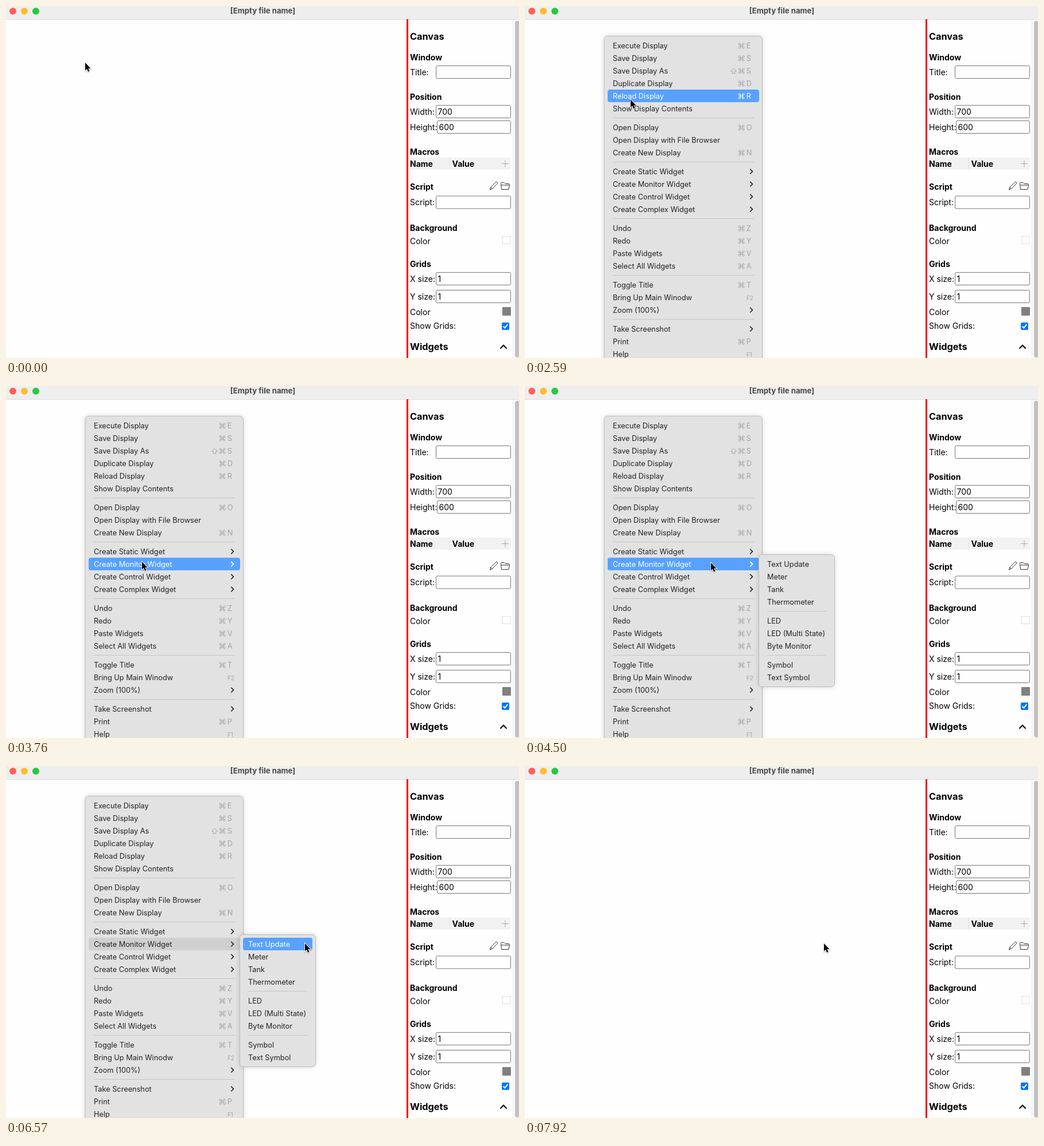
Recreate the animation shown at these times as an HTML page. Size 894x615 px, loop 8 s.

```html
<!DOCTYPE html>
<html lang="en">
<head>
<meta charset="utf-8">
<title>Display editor</title>
<style>
html, body { margin: 0; width: 100%; height: 100%; overflow: hidden; background: #fefefe; }
svg { display: block; width: 894px; height: 615px; font: 14px Inter, "Liberation Sans", sans-serif; }
.bold { font-weight: 700; }
.big { font-size: 16.3px; font-weight: 700; }
.title { font-size: 13.2px; font-weight: 700; fill: #474747; text-anchor: middle; }
.field { fill: #fff; stroke: #767676; }
.line { fill: none; stroke: #333; stroke-linejoin: round; }
.menu { font-size: 12.75px; }
.panel { fill: #e2e2e2; stroke: #bcbcbc; }
.shadow { fill: #000; opacity: .16; filter: blur(5px); }
.sep { stroke: #c6c6c6; }
.row rect { fill: none; }
.row text { fill: #232323; }
.row .key { fill: #a3a3a3; }
.row .small { font-size: 9.8px; }
.row .mark { fill: none; stroke: #a3a3a3; }
.row .more { fill: none; stroke: #2a2a2a; stroke-width: 1.7; stroke-linecap: round; stroke-linejoin: round; }
.row.held rect { fill: #d0d0d0; }
.row.on rect { fill: #58a1ff; }
.row.on text { fill: #fff; }
.row.on .mark, .row.on .more { stroke: #fff; }
#cursor { filter: drop-shadow(0 1px 1px rgba(0, 0, 0, .3)); }
</style>
</head>
<body>
<svg viewBox="0 0 894 615">
  <rect width="894" height="615" fill="#fefefe"/>
  <g id="side"></g>
  <rect width="894" height="23" fill="#eee"/>
  <rect y="23" width="894" height="1" fill="#dcdcdc"/>
  <circle cx="12" cy="9" r="6" fill="#ff5f57"/>
  <circle cx="32" cy="9" r="6" fill="#febc2e"/>
  <circle cx="52" cy="9" r="6" fill="#28c840"/>
  <text class="title" x="447.5" y="13">[Empty file name]</text>
  <rect x="698" y="23" width="3" height="592" fill="#f00000"/>
  <g id="menus" class="menu">
    <g id="main"></g>
    <g id="sub"></g>
  </g>
  <path id="cursor" d="M0 0V13.6L3 10.8 5.1 15.7 7.5 14.7 5.4 9.9H9.6Z" fill="#000" stroke="#fff" stroke-width="1.8" paint-order="stroke"/>
</svg>
<script>
const $ = id => document.getElementById(id);

// Sidebar
const label = (s, y, cls = '', x = 704) => `<text class="${cls}" x="${x}" y="${y}">${s}</text>`;
const field = (y, value = '', x = 749) =>
  `<rect class="field" x="${x + .5}" y="${y + .5}" width="${879 - x}" height="22" rx="2"/>` +
  label(value, y + 16.5, '', x + 3.5);

$('side').innerHTML = [
  '<rect x="883" y="24" width="11" height="591" fill="#fafafa"/>',
  '<rect x="883" y="24" width="1" height="591" fill="#e8e8e8"/>',
  '<rect x="887" y="26" width="8" height="588" rx="3.5" fill="#c1c1c1"/>',
  label('Canvas', 58.7, 'big'),
  label('Window', 94.5, 'bold'), label('Title:', 120.5), field(104),
  label('Position', 163.5, 'bold'),
  label('Width:', 189.5), field(173, '700'),
  label('Height:', 216.5), field(200, '600', 751),
  label('Macros', 259.5, 'bold'),
  '<rect x="704" y="265" width="176" height="21" fill="#f2f2f2"/>',
  '<rect x="773" y="265" width="1" height="21" fill="#e2e2e2"/>',
  label('Name', 280.5, 'bold'), label('Value', 280.5, 'bold', 777.5),
  '<path d="M864 275.5h12M870 269.5v12" stroke="#a8a8a8"/>',
  label('Script', 321, 'bold'),
  '<path class="line" d="M843.5 321l1.2-4.2 9.3-9.2q1.4-.8 2.3.2t.2 2.3l-9.2 9.3zM844.7 316.8l2.6 2.6"/>',
  '<path class="line" d="M863.5 320.5l-1-9v-2q0-1 1-1h4.5l2 2h6q1 0 1 1v1.5M863.5 320.5h12.5l1.5-7.5h-14.8"/>',
  label('Script:', 348), field(331.5),
  label('Background', 393, 'bold'), label('Color', 415.5),
  '<rect x="865.5" y="402.5" width="14" height="13" fill="#fff" stroke="#e0e0e0"/>',
  label('Grids', 455.5, 'bold'),
  label('X size:', 481.5), field(465, '1'),
  label('Y size:', 512.5), field(496, '1'),
  label('Color', 540),
  '<rect x="865" y="526" width="15" height="15" rx="1" fill="#808080"/>',
  label('Show Grids:', 564),
  '<rect x="864" y="553" width="13" height="13" rx="2" fill="#0075ff"/>',
  '<path d="M866.7 559.8l2.6 2.7 5-6.3" fill="none" stroke="#fff" stroke-width="2"/>',
  label('Widgets', 601.3, 'big'),
  '<path d="M861.5 598.5l5.5-5.7 5.5 5.7" fill="none" stroke="#000" stroke-width="2"/>'
].join('');

// Menus: "label|shortcut", ">" opens a submenu, "^" adds the shift mark, "-" separates
const mainItems = `Execute Display|E;Save Display|S;Save Display As|^S;Duplicate Display|D;Reload Display|R;Show Display Contents;-;
Open Display|O;Open Display with File Browser;Create New Display|N;-;
Create Static Widget|>;Create Monitor Widget|>;Create Control Widget|>;Create Complex Widget|>;-;
Undo|Z;Redo|Y;Paste Widgets|V;Select All Widgets|A;-;
Toggle Title|T;Bring Up Main Winodw|F2;Zoom (100%)|>;-;
Take Screenshot|>;Print|P;Help|F1`;
const subItems = 'Text Update;Meter;Tank;Thermometer;-;LED;LED (Multi State);Byte Monitor;-;Symbol;Text Symbol';

const command = y => `<path class="mark" d="M375.2 ${y - 1.5}h-1.6a1.6 1.6 0 1 1 1.6-1.6v6.2a1.6 1.6 0 1 1-1.6-1.6h6.8a1.6 1.6 0 1 1-1.6 1.6v-6.2a1.6 1.6 0 1 1 1.6 1.6z"/>`;
const shift = y => `<path class="mark" d="M363.5 ${y - 4.5}l5 5h-2.7v4h-4.6v-4h-2.7z"/>`;

function keyMark(key, y) {
  if (!key) return '';
  if (key === '>') return `<path class="more" d="M392.7 ${y - 3.6}l3.8 3.8-3.8 3.8"/>`;
  if (key[0] === 'F') return label(key, y + 4.5, 'key small', 386);
  return command(y + .5) + (key[0] === '^' ? shift(y + .5) : '') +
    label(key.slice(-1), y + 5, 'key', 385.7);
}

function buildMenu(host, items, x, y, w, h, textX, sepEnd, first) {
  const box = `x="${x}" y="${y}" width="${w}" height="${h}" rx="6"`;
  const rows = [];
  let html = `<rect class="shadow" ${box}/><rect class="panel" ${box}/>`;
  let c = first;
  for (const item of items.split(';')) {
    const [name, key] = item.trim().split('|');
    if (name === '-') {
      html += `<path class="sep" d="M${textX} ${c - 5.5}H${sepEnd}"/>`;
      c += 11;
      continue;
    }
    html += `<g class="row"><rect x="${textX - 9}" y="${c - 11}" width="${sepEnd - textX + 18}" height="22" rx="4"/>` +
      label(name, c + 5, '', textX) + keyMark(key, c) + '</g>';
    rows.push(c);
    c += 22;
  }
  host.innerHTML = html;
  return [...host.querySelectorAll('.row')].map((el, i) => ({ el, y: rows[i] }));
}

const mainRows = buildMenu($('main'), mainItems, 138, 52.5, 275.5, 620, 153, 399, 69);
const subRows = buildMenu($('sub'), subItems, 407.5, 294.5, 132, 231, 422, 525, 311);

// Pointer runs: first step, last step, number of steps, end point
const runs = [
  [500, 1090, 5, 138, 58],
  [2140, 3170, 8, 230, 269],
  [3310, 3760, 4, 237, 307],
  [4210, 4640, 4, 340, 309],
  [5090, 5540, 4, 426, 309],
  [5690, 6130, 4, 520, 317],
  [6270, 6570, 3, 521, 310]
];

function pointer(t) {
  let x = 138, y = 99;
  for (const [from, to, steps, endX, endY] of runs) {
    if (t < from) break;
    const gap = (to - from) / (steps - 1);
    const p = Math.min(1, (Math.floor((t - from + 5) / gap) + 1) / steps);
    const e = p * p * (3 - 2 * p);
    x += (endX - x) * e;
    y += (endY - y) * e;
  }
  return [x, y];
}

function draw(t) {
  const [x, y] = pointer(t);
  const subOpen = t >= 3910;
  const inSub = subOpen && x > 408;
  const hit = row => Math.abs(y - 3 - row.y) < 11;
  $('cursor').setAttribute('transform', `translate(${x.toFixed(1)} ${y.toFixed(1)})`);
  $('menus').style.display = t >= 1390 && t < 7920 ? '' : 'none';
  $('menus').style.opacity = t < 7770 ? 1 : .76;
  $('sub').style.display = subOpen ? '' : 'none';
  for (const row of mainRows) {
    row.el.classList.toggle('on', !inSub && hit(row));
    row.el.classList.toggle('held', inSub && row.y === 311);
  }
  for (const row of subRows) row.el.classList.toggle('on', inSub && hit(row));
}

const start = performance.now();
function tick() {
  draw((performance.now() - start) % 8000);
  requestAnimationFrame(tick);
}
tick();
</script>
</body>
</html>
```
